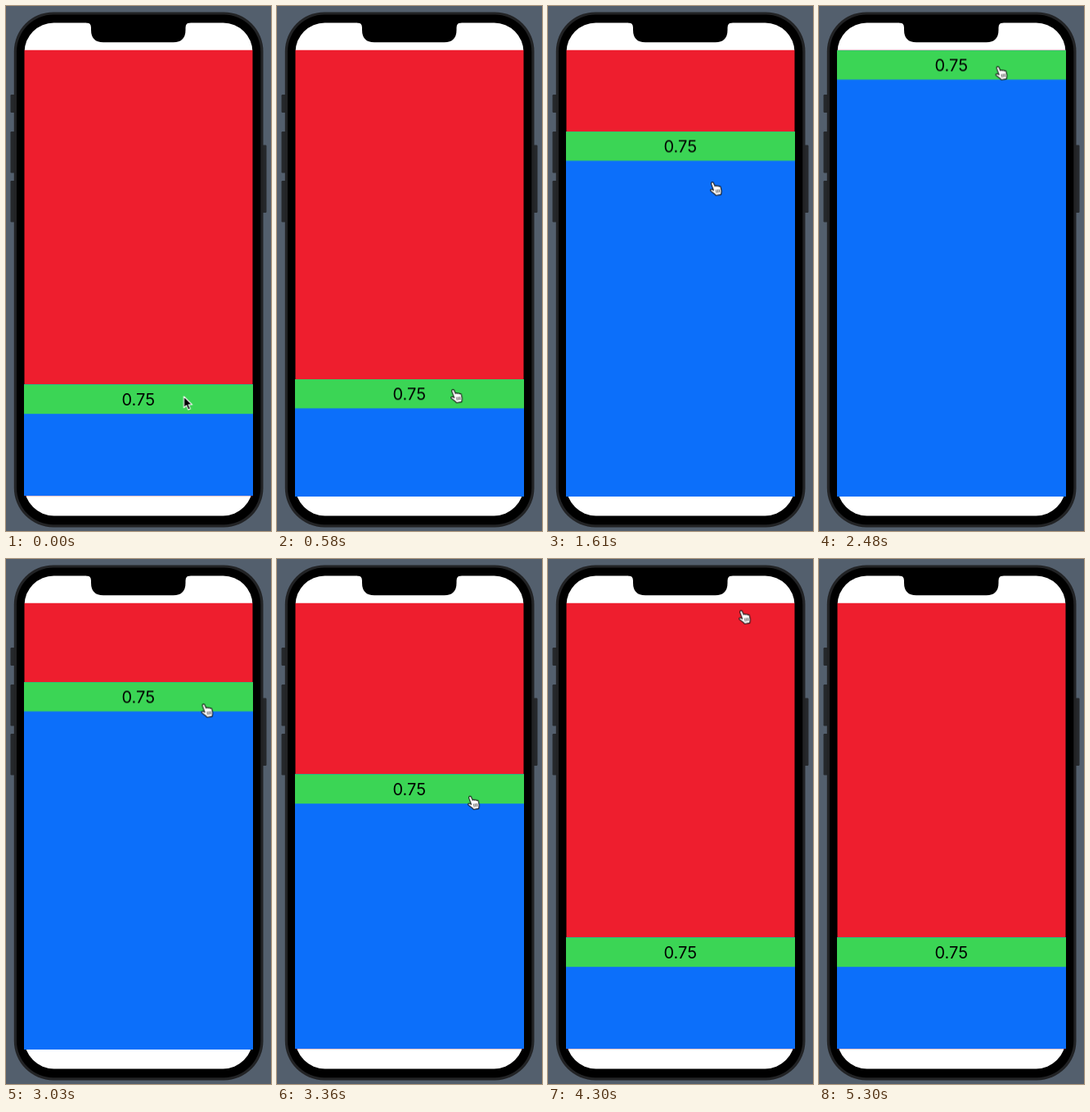
These frames come from a looping animation (324 by 640 pixels, 5.45 s). An HTML page:

```html
<!DOCTYPE html>
<html lang="en">
<head>
<meta charset="utf-8">
<title>Draggable divider</title>
<style>
  html, body { margin: 0; width: 100%; height: 100%; overflow: hidden; background: #535f6d; }
  svg { display: block; width: 100vw; height: 100vh; }
  text { font: 20px Inter, Roboto, sans-serif; text-anchor: middle; }

  .divider, .cursor, .arrow, .hand { animation: 5450ms linear infinite; }
  .divider { animation-name: divide; }
  .cursor { animation-name: point; }
  .arrow { animation-name: arrow; animation-timing-function: step-end; }
  .hand { animation-name: hand; animation-timing-function: step-end; }

  /* Drag up, spring to the top, drag down, spring to three quarters. */
  @keyframes divide {
    0% { transform: translateY(461.3px); }
    9.17% { transform: translateY(461.3px); animation-timing-function: cubic-bezier(.45, 0, .6, .85); }
    19.45% { transform: translateY(250px); animation-timing-function: cubic-bezier(.3, .5, .6, .9); }
    27.16% { transform: translateY(203px); animation-timing-function: cubic-bezier(.4, .15, .7, .6); }
    29.54% { transform: translateY(153.3px); animation-timing-function: cubic-bezier(.2, .45, .4, 1); }
    37.6% { transform: translateY(53.8px); }
    52.29% { transform: translateY(53.8px); animation-timing-function: cubic-bezier(.5, 0, .8, .7); }
    55.6% { transform: translateY(149.3px); animation-timing-function: cubic-bezier(.15, .45, .5, .95); }
    66.06% { transform: translateY(284px); animation-timing-function: cubic-bezier(.4, .15, .7, .6); }
    68.99% { transform: translateY(386px); animation-timing-function: cubic-bezier(.15, .45, .4, 1); }
    77.06%, 100% { transform: translateY(461.3px); }
  }
  @keyframes point {
    0% { transform: translate(217.5px, 476px); }
    9.17% { transform: translate(215px, 475.5px); animation-timing-function: cubic-bezier(.45, 0, .6, .85); }
    19.45% { transform: translate(204px, 264px); animation-timing-function: cubic-bezier(.3, .5, .6, .9); }
    27.16% { transform: translate(200.5px, 217px); }
    29.54% { transform: translate(200.5px, 216px); animation-timing-function: cubic-bezier(.45, 0, .5, 1); }
    45.5% { transform: translate(218px, 75px); animation-timing-function: ease-out; }
    49% { transform: translate(223px, 81.5px); }
    52.29% { transform: translate(223px, 81.5px); animation-timing-function: cubic-bezier(.5, 0, .8, .7); }
    55.6% { transform: translate(241px, 177.5px); animation-timing-function: cubic-bezier(.15, .45, .5, .95); }
    66.06% { transform: translate(234.5px, 312px); }
    68.99% { transform: translate(234.5px, 315px); }
    72% { transform: translate(234.5px, 314px); animation-timing-function: cubic-bezier(.5, 0, .7, .8); }
    81%, 100% { transform: translate(236px, -28px); }
  }
  @keyframes arrow { 0% { opacity: 1; } 4.6%, 100% { opacity: 0; } }
  @keyframes hand { 0% { opacity: 0; } 4.6%, 100% { opacity: 1; } }
</style>
</head>
<body>
<svg viewBox="0 0 324 640" preserveAspectRatio="none">
  <defs>
    <clipPath id="content"><rect x="22.5" y="53.8" width="279" height="543.5"/></clipPath>
  </defs>

  <g fill="#25282b">
    <rect x="5.5" y="108" width="5" height="22" rx="1.2"/>
    <rect x="5.5" y="153" width="5" height="50.5" rx="1.2"/>
    <rect x="5.5" y="213" width="5" height="50.5" rx="1.2"/>
    <rect x="313.5" y="169.5" width="5" height="82.5" rx="1.2"/>
  </g>
  <rect x="9.8" y="7.4" width="304.7" height="628" rx="48" fill="#222325"/>
  <rect x="13" y="10.6" width="298.3" height="621.6" rx="45"/>
  <rect x="22.5" y="20.4" width="279" height="601" rx="36" fill="#fff"/>
  <path d="M98 18V20.3Q104 20.3 104 26.5V29Q104 44.3 119 44.3H204.5Q219.5 44.3 219.5 29V26.5Q219.5 20.3 225.5 20.3V18Z"/>

  <!-- Black underlay keeps white from showing at the side edges. -->
  <rect x="20" y="54" width="284" height="543"/>
  <g clip-path="url(#content)">
    <rect x="22" y="53" width="280" height="545" fill="#ee1e2e"/>
    <g class="divider">
      <rect x="22" y="35" width="280" height="545" fill="#0c6ffa"/>
      <rect x="22" width="280" height="35.9" fill="#3bd555"/>
      <text x="161.8" y="25.3">0.75</text>
    </g>
  </g>

  <g class="cursor" stroke-linejoin="round" stroke-linecap="round">
    <path class="arrow" d="M0 0V13.8L3.1 10.9L5.4 16.2L7.9 15.1L5.7 10H10Z" stroke="#fff" stroke-width="1.1"/>
    <g class="hand" stroke="#111">
      <g transform="translate(.3 -.8) scale(.9)">
        <path d="M-1.5 1.5C-1.5-1 1.5-1 2 1l1.8 4c.5-1.3 2.4-1.2 2.8 0 .6-1 2.2-.8 2.6.4.9-.7 2.2-.2 2.4 1.1l.9 4.5c.3 2-.3 3-.5 5.2l-7 1.3c-1.3-2.4-4.5-3.5-6.9-6-1.4-1.6.5-2.8 1.9-2l1.9 1.1z" fill="#fff" stroke-width="1.2"/>
        <path d="M5.1 10.2l.8 3.6M7.3 9.8l.7 3.6M9.5 9.5l.6 3.5" fill="none" stroke-width=".8"/>
      </g>
    </g>
  </g>
</svg>
</body>
</html>
```
